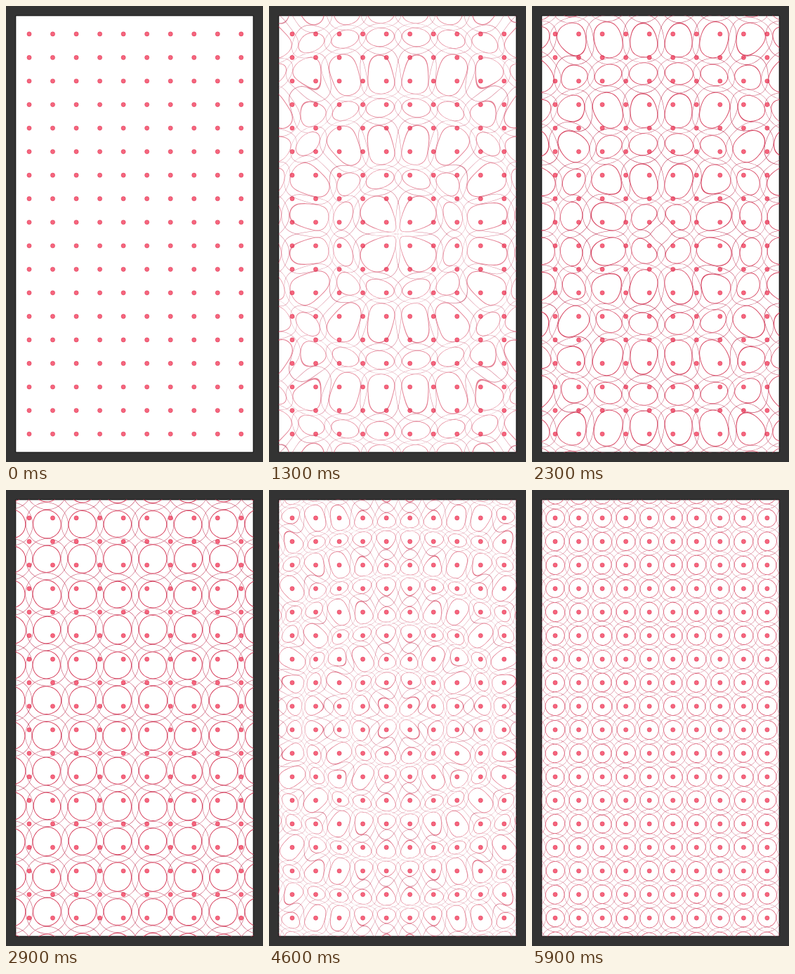
Recreate the animation shown at these times as an HTML page with a canvas. Size 366 px wide and 650 px high, loop 6 s.

```html
<!DOCTYPE html>
<html>
<head>
<meta charset="utf-8">
<style>
  html, body { margin: 0; height: 100%; overflow: hidden; background: #333; }
  canvas { display: block; }
</style>
</head>
<body>
<canvas id="stage" width="366" height="650"></canvas>
<script>
const ctx = document.getElementById('stage').getContext('2d');
const TAU = Math.PI * 2;
const CX = 183, CY = 325;   // stage and ripple centre
const GRID_X = 0.95;        // the lattice sits slightly right of the ripple centre
const PITCH = 33.54;
const HALF = 3;             // seconds per half loop
const STEPS = 48;           // points per ring edge

// Radial ripple: a pixel at radius r shows the pattern at r + amp * cos(PI * r - phase) * -1.
// Returns the radius where pattern radius s appears (all in units of the pitch).
function rippleRadius(s, amp, phase) {
  let r = s;
  for (let i = 0; i < 6; i++) {
    const a = Math.PI * r - phase;
    r -= (r - amp * Math.cos(a) - s) / (1 + amp * Math.PI * Math.sin(a));
  }
  return Math.max(0, r);
}

function addEdge(x, y, radius, dir, side, wave) {
  for (let i = 0; i < STEPS; i++) {
    const a = dir * i / STEPS * TAU;
    const px = x + radius * Math.cos(a), py = y + radius * Math.sin(a);
    const s = Math.hypot(px, py) || 1e-6;
    const k = side * rippleRadius(side * s, wave.amp, wave.phase) / s * wave.pitch;
    ctx[i ? 'lineTo' : 'moveTo'](CX + px * k, CY + py * k);
  }
  ctx.closePath();
}

function drawRings(radius, width, color, wave) {
  const cols = Math.ceil(170 / wave.pitch) + 1;
  const rows = Math.ceil(312 / wave.pitch) + 1;
  ctx.fillStyle = color;
  for (let j = -rows; j < rows; j++) {
    for (let i = -cols; i < cols; i++) {
      const x = i + 0.5 + GRID_X / wave.pitch, y = j + 0.5;
      // the four middle rings also show mirrored through the centre
      const sides = Math.hypot(x, y) < 1 ? [1, -1] : [1];
      for (const side of sides) {
        ctx.beginPath();
        addEdge(x, y, radius + width / 2, 1, side, wave);
        addEdge(x, y, radius - width / 2, -1, side, wave);
        ctx.fill();
      }
    }
  }
}

function drawDots() {
  ctx.fillStyle = 'rgba(243,62,92,.8)';
  ctx.strokeStyle = 'rgba(215,40,72,.55)';
  ctx.lineWidth = 0.8;
  for (let j = 0; j < 18; j++) {
    for (let i = 0; i < 10; i++) {
      ctx.beginPath();
      ctx.arc(CX + GRID_X + (i - 4.5) * PITCH, CY + (j - 8.5) * PITCH, 3.1, 0, TAU);
      ctx.fill();
      ctx.stroke();
    }
  }
}

function draw(seconds) {
  const t = seconds % HALF, p = t / HALF;
  const wave = {
    pitch: seconds < HALF ? PITCH * 1.5 : PITCH,
    amp: 0.228 * (1 - p ** 3),
    phase: Math.PI * (t - 0.03)
  };

  ctx.fillStyle = '#333';
  ctx.fillRect(0, 0, 366, 650);
  ctx.beginPath();
  ctx.rect(13.8, 13.8, 338.4, 622.4);
  ctx.fillStyle = '#fff';
  ctx.fill();
  ctx.strokeStyle = '#000';
  ctx.lineWidth = 1;
  ctx.stroke();

  drawDots();
  ctx.save();
  ctx.beginPath();
  ctx.rect(13.5, 13.5, 339, 623);
  ctx.clip();
  ctx.globalAlpha = Math.sin(p * Math.PI / 2);
  drawRings(0.595, 0.0105, '#c4415f', wave);
  drawRings(0.392, 0.0185, '#d63a58', wave);
  ctx.restore();
}

function loop() {
  draw(performance.now() / 1000 % (2 * HALF));
  requestAnimationFrame(loop);
}
loop();
</script>
</body>
</html>
```
